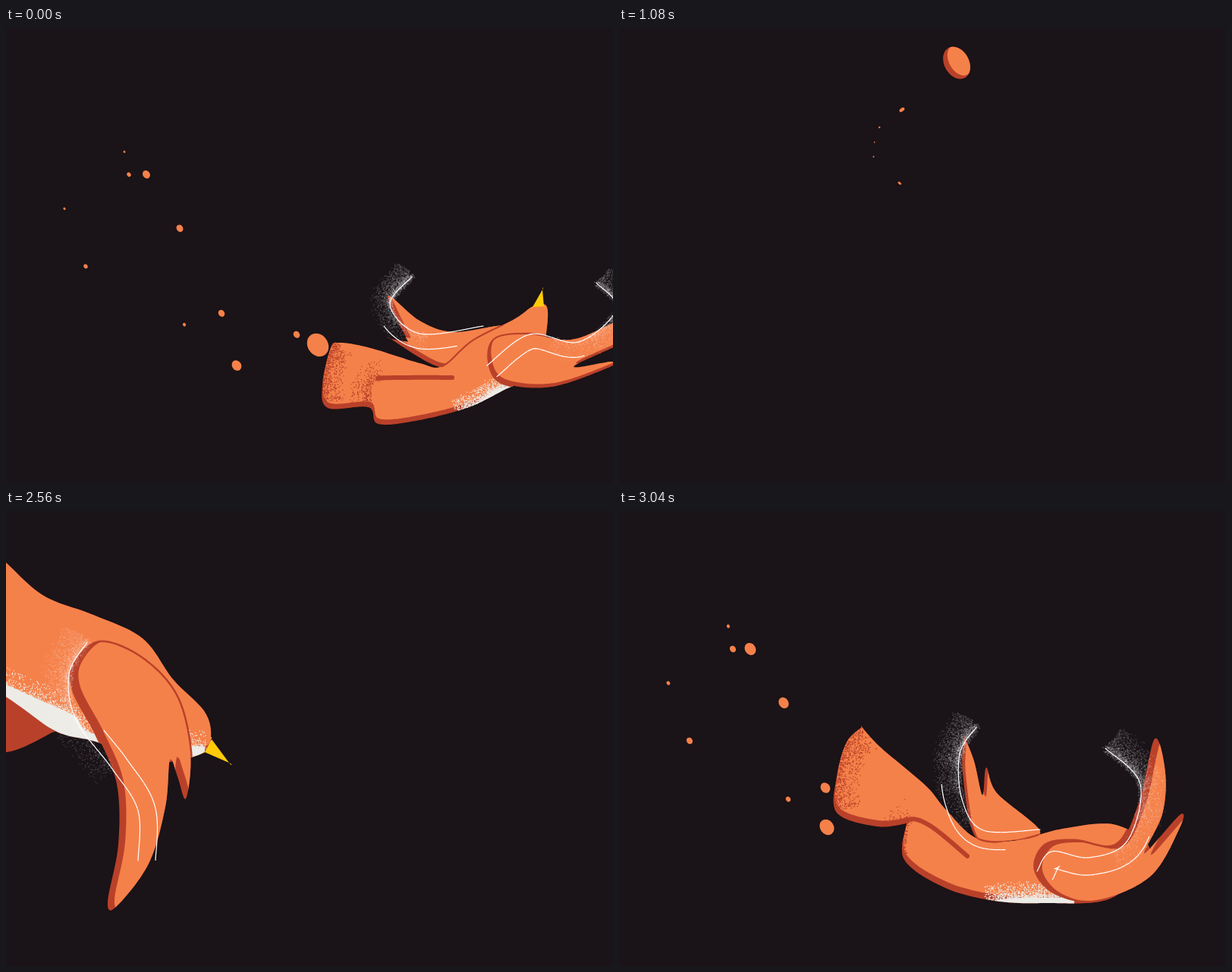
An HTML page with a canvas that plays this animation: 800x600 px, repeating every 3.12 s.

```html
<!DOCTYPE html>
<html lang="en">
<head>
<meta charset="utf-8">
<title>Bird</title>
<style>
html, body { margin: 0; height: 100%; overflow: hidden; background: #1a1317; }
canvas { display: block; width: 100vw; height: 100vh; }
</style>
</head>
<body>
<canvas id="stage" width="800" height="600"></canvas>
<script>
const ctx = document.getElementById('stage').getContext('2d');
const BG = '#1a1317', ORANGE = '#f5814a', RED = '#b9412a', WHITE = '#ecebe6', YELLOW = '#fecb0a';
const LOOP = 3120, SAMPLES = 240;

// Key points of smooth curves; a doubled point is a corner. Shading and trails are derived from them.
const closedParts = ['far', 'body', 'beak', 'near'];
const poses = {
  dive: {
    farShift: [300, 0], nearShift: [9, -3], smoke: -30, size: 1,
    far: '-20,230 65,290 65,290 0,318 -60,300',
    body: '-215,-120 -50,20 0,68 50,112 115,137 180,168 220,222 262,265 270,300 258,320 200,330 118,304 65,290 0,245 -160,140 -290,-20',
    beak: '271,301 294,332 262,318',
    belly: '-10,224 40,247 90,270 120,295 262,311',
    near: '89,235 92,200 125,173 180,195 225,245 243,320 237,380 226,350 216,328 210,390 188,465 145,522 134,515 148,440 146,360 120,295',
    line3: '107,173 83,215 92,275 140,340 174,395 174,461'
  },
  stoop: {
    farShift: [7, 4], nearShift: [10, 1], smoke: 25, size: 1,
    far: '405,395 413,290 435,185 453,138 455,180 443,255 445,324 456,312 474,289 470,330 455,425 430,418',
    body: '182,95 182,95 192,125 230,186 266,240 290,302 345,368 432,416 500,429 556,432 569,448 560,467 525,478 500,505 462,515 415,496 362,462 303,457 262,420 243,338 196,272 138,240 86,228 85,193 115,135 150,106',
    beak: '569,446 602,445 569,466',
    belly: '362,462 400,479 470,493 515,478 568,463',
    near: '431,440 452,385 472,310 489,225 488,163 505,185 521,260 521,340 508,425 508,425 538,377 538,398 520,442 465,482',
    fold: '250,395 243,338 280,365 318,387',
    line1: '449,128 415,205 397,320 406,400',
    line3: '468,139 477,215 463,330 466,410 445,452 428,443'
  },
  sweep: {
    farShift: [4, 2], nearShift: [9, 2], smoke: 28, size: 1,
    far: '470,430 453,345 455,297 455,297 468,330 479,375 484,338 498,372 555,422 520,434',
    body: '320,285 320,285 345,312 404,362 430,393 470,431 520,435 585,419 655,414 700,450 650,510 560,517 495,514 430,497 376,460 379,412 379,412 340,416 287,398 287,350 300,305',
    beak: '690,452 702,455 695,462',
    belly: '485,515 530,510 600,510',
    near: '549,472 562,441 600,435 655,441 685,385 706,300 720,345 716,400 692,452 740,400 738,420 700,482 630,513 575,503',
    fold: '378,465 374,440 381,408 410,415 459,455',
    line1: '471,285 449,320 452,380 480,421 555,420',
    line3: '641,313 687,360 670,435 620,457 570,449 551,475'
  },
  climb: {
    farShift: [4, -5], nearShift: [3, -5], smoke: 22, size: 0.85,
    far: '572,447 507,410 507,410 530,414 530,414 503,353 545,386 590,401 660,393 615,430',
    body: '440,415 480,422 545,442 575,446 615,412 670,384 695,367 713,368 711,410 700,465 668,472 610,500 540,518 490,522 478,500 424,501 417,470 428,422',
    beak: '694,368 707,345 709,367',
    belly: '596,507 625,492 645,477 672,470',
    near: '637,440 645,410 690,404 745,411 800,389 840,370 830,405 748,446 798,440 798,446 720,473 655,468',
    fold: '484,512 478,485 484,464 530,461 588,461',
    line1: '535,328 506,365 545,403 629,393',
    line3: '778,336 805,370 755,414 690,404 634,445'
  },
  away: {
    farShift: [-3, 1], nearShift: [1, -2], smoke: 12, size: 0.35,
    far: '616,198 624,163 640,165 632,180 622,200',
    body: '711,262 712,240 672,209 635,199 597,188 594,200 640,220 660,239 663,228 680,250 686,246 700,282 697,255 705,262',
    beak: '585,190 596,190 588,197',
    belly: '592,198 625,209 645,218 661,236',
    near: '616,200 598,178 586,182 584,168 600,158 614,170',
    line1: '585,151 610,149 621,168 612,190',
    line3: '665,160 648,149 624,185'
  }
};

const lerp = (a, b, u) => a + (b - a) * u;
const mix = (a, b, u) => a.map((v, i) => Array.isArray(v) ? mix(v, b[i], u) : lerp(v, b[i], u));
const spline = (a, b, c, d, u) =>
  b + u * (c - a + u * (2 * a - 5 * b + 4 * c - d + u * (3 * (b - c) + d - a))) / 2;

// Catmull-Rom value of a row of points at position s, counted in points.
function splineAt(points, s, closed) {
  const n = points.length, k = Math.floor(s);
  const at = i => closed ? points[(i + n) % n] : points[Math.max(0, Math.min(n - 1, i))];
  return points[0].map((_, c) => spline(at(k - 1)[c], at(k)[c], at(k + 1)[c], at(k + 2)[c], s - k));
}

function random(seed) {
  return () => {
    seed = (seed * 1664525 + 1013904223) >>> 0;
    return seed / 4294967296;
  };
}

// Curve resampled to equal steps so that any two outlines can blend.
function curve(text, closed, straight) {
  let p = text.split(' ').map(s => s.split(',').map(Number));
  if (straight) p = p.flatMap(q => [q, q]);
  const dense = [], lengths = [0], out = [];
  for (let i = 0; i <= (closed ? p.length : p.length - 1) * 12; i++) {
    dense.push(splineAt(p, i / 12, closed));
    if (i) lengths.push(lengths[i - 1] + Math.hypot(dense[i][0] - dense[i - 1][0], dense[i][1] - dense[i - 1][1]));
  }
  const total = lengths[lengths.length - 1];
  for (let i = 0, k = 1; i <= SAMPLES; i++) {
    const want = total * i / SAMPLES;
    while (k < dense.length - 1 && lengths[k] < want) k++;
    out.push(mix(dense[k - 1], dense[k], (want - lengths[k - 1]) / (lengths[k] - lengths[k - 1] || 1)));
  }
  return out;
}

for (const pose of Object.values(poses))
  for (const key in pose)
    if (typeof pose[key] === 'string') pose[key] = curve(pose[key], closedParts.includes(key), key === 'beak');

function blend(a, b, u) {
  if (u === 0) return a;
  const out = {};
  for (const key in a)
    if (key in b) out[key] = Array.isArray(a[key]) ? mix(a[key], b[key], u) : lerp(a[key], b[key], u);
  return out;
}

const part = (line, from, to) => line.slice(Math.round(from * SAMPLES), Math.round(to * SAMPLES) + 1);
const shifted = (points, dx, dy) => points.map(([x, y]) => [x + dx, y + dy]);

// Point beside a line, at distance d to the left of its direction.
function beside(line, k, d) {
  const [x, y] = line[k], [nx, ny] = line[k + 1];
  const len = Math.hypot(nx - x, ny - y) || 1;
  return [x + (ny - y) / len * d, y - (nx - x) / len * d];
}
const parallel = (line, d) => line.slice(1).map((_, k) => beside(line, k, d));

function trace(points) {
  ctx.beginPath();
  points.forEach(([x, y]) => ctx.lineTo(x, y));
}
function fill(points, color) {
  trace(points);
  ctx.fillStyle = color;
  ctx.fill();
}
function stroke(points, color, width) {
  trace(points);
  ctx.strokeStyle = color;
  ctx.lineWidth = width;
  ctx.lineCap = ctx.lineJoin = 'round';
  ctx.stroke();
}
function clipped(points, draw) {
  ctx.save();
  trace(points);
  ctx.clip();
  draw();
  ctx.restore();
}
// Orange shape whose dark rim shows where the lit area is moved away.
function shaded(points, [dx, dy]) {
  fill(points, RED);
  clipped(points, () => fill(shifted(points, dx, dy), ORANGE));
}

// Speckles that thin out to one side of a line.
function grain(line, width, count, color, dot) {
  const rnd = random(7);
  ctx.fillStyle = color;
  for (let i = 0; i < count; i++) {
    const [x, y] = beside(line, Math.floor(rnd() * (line.length - 1)), width * rnd() ** 2.2);
    const loose = width * 0.3;
    ctx.fillRect(x + (rnd() - 0.5) * loose, y + (rnd() - 0.5) * loose, dot, dot);
  }
}
// Motion smoke: densest near the middle of its line, soft at both ends.
function smoke(line, width, size) {
  for (const end of [0.25, 0.4, 0.6])
    grain(part(line, 0, end), width * (1.3 - end / 2), 900 * size, 'rgba(255,255,255,.16)', 0.8 + 0.5 * size);
}

function drawBird(b) {
  const s = b.size, dot = 0.7 + 0.5 * s, gap = 23 * s;
  shaded(b.far, b.farShift);
  if (b.line1) smoke(b.line1, -Math.abs(b.smoke), s);
  shaded(b.body, [2 * s, -8 * s]);
  clipped(b.far, () => stroke(b.body, RED, 2.5 * s));
  clipped(b.body, () => {
    fill([...b.belly, ...shifted(b.belly, 0, 60 * s).reverse()], WHITE);
    grain(b.belly, 20 * s, 1200 * s, WHITE, dot);
    grain(part(b.body, 0.89, 1), -30 * s, 900 * s, RED, dot);
    if (b.fold) {
      grain(part(b.fold, 0, 0.4), 30 * s, 600 * s, RED, dot);
      stroke(part(b.fold, 0.37, 1), RED, 6);
    }
  });
  fill(b.beak, YELLOW);
  clipped(b.body, () => stroke(b.near, RED, 5 * s));
  shaded(b.near, b.nearShift);
  smoke(b.line3, b.smoke, s);
  const lines = [b.line3, parallel(part(b.line3, 0.45, 1), gap)];
  if (b.line1) lines.push(b.line1, parallel(part(b.line1, 0.35, 0.8), -gap));
  lines.forEach(line => stroke(line, '#fff', 1.2));
}

function drop(x, y, rx, ry = rx * 1.2, turn = -0.6, color = ORANGE) {
  if (rx <= 0.6 || ry <= 0.6) return;
  ctx.beginPath();
  ctx.ellipse(x, y, rx, ry, turn, 0, 7);
  ctx.fillStyle = color;
  ctx.fill();
}

// Drops shed in the dive: x, y, radius and speed when the bird levels out.
const shed = [
  [144, 152, 2], [150, 182, 3.8], [173, 182, 7], [217, 253, 6.3], [65, 227, 2.2], [93, 303, 3.8],
  [223, 380, 3], [272, 365, 6], [274, 417, 9, 2.5], [371, 393, 6], [411, 418, 20, 0]
];
function drawShed(t) {
  const age = (t + LOOP / 2) % LOOP - LOOP / 2 + 80;
  if (age < -160 || age > 240) return;
  for (const [x, y, r, speed = 1] of shed)
    drop(x + 0.15 * age * speed, y + 0.14 * age * speed, r * Math.min(1.2, 1 - age / 240));
}

// Way of the small bird: x, y and scale every 160 ms.
const BEAT = 160, VANISH = 1080;
const route = [
  [570, 480, 1.4], [705, 345, 1.2], [645, 210, 1], [560, 175, 0.8],
  [480, 205, 0.65], [400, 215, 0.5], [337, 140, 0.4], [470, 40, 0.3]
];
const routeAt = t => splineAt(route, t / BEAT);
function headingAt(t) {
  const [x, y] = routeAt(t - 5), [nx, ny] = routeAt(t + 5);
  return Math.atan2(ny - y, nx - x);
}

function drawTrail(t) {
  const rnd = random(9), life = 350;
  for (let born = 20; born < Math.min(t, VANISH); born += 32) {
    const [x, y, scale] = routeAt(born), age = t - born, left = 1 - age / life;
    const r = (1.5 + 5.5 * rnd() ** 2) * (0.3 + 0.7 * scale) * left;
    const side = (rnd() - 0.5) * 24 * scale, stretch = 1 + rnd() * 1.2;
    if (age > 40 && left > 0) drop(x + side, y + age * 0.03, r, r * stretch, headingAt(born) + Math.PI / 2);
  }
}

function drawSmallBird(t) {
  const [x, y, scale] = routeAt(t);
  ctx.save();
  ctx.translate(x, y);
  ctx.rotate(headingAt(t) - headingAt(2 * BEAT));
  ctx.scale(scale, scale);
  ctx.translate(-645, -210);
  drawBird(poses.away);
  ctx.restore();
}

function drawBall(t) {
  const u = Math.max(0, (t - 1200) / 480), tall = 22.5 + 6 * u;
  ctx.save();
  ctx.translate(lerp(445, 393, u), 46 + 470 * u * u);
  ctx.rotate(lerp(-0.5, 0, Math.min(1, u * 1.5)));
  drop(0, 0, 16.3, tall, 0, RED);
  ctx.clip();
  drop(5, -1, 14, tall - 1, 0);
  ctx.restore();
}

function drawSplash(t) {
  const u = (t - 1680) / 400, rnd = random(11);
  drop(393, 535, 62 * (1 - u), 18 * (1 - u) ** 2, 0);
  for (let i = 0; i < 16; i++) {
    const x = (rnd() - 0.5) * 205, lift = 180 + rnd() * 480, r = 3 + rnd() * 8;
    drop(393 + x * Math.sqrt(u), 525 - lift * u * (1.05 - u), r * (1 - u), r * 1.3 * (1 - u), x / 160);
  }
}

function drawMoved(dx, dy, bird) {
  ctx.save();
  ctx.translate(dx, dy);
  drawBird(bird);
  ctx.restore();
}

function drawScene(t) {
  ctx.fillStyle = BG;
  ctx.fillRect(0, 0, 800, 600);
  drawShed(t);
  drawTrail(t);
  if (t < 320) {
    const u = t / 320, arc = Math.sin(Math.PI * u);
    drawMoved(75 * arc, 20 * arc, blend(poses.climb, poses.away, u));
  } else if (t < VANISH) drawSmallBird(t);
  else if (t < 1680) drawBall(t);
  else if (t < 2080) drawSplash(t);
  else if (t >= 3040) drawBird(poses.sweep);
  else if (t >= 2880) drawBird(blend(poses.stoop, poses.sweep, (t - 2880) / 160));
  else if (t >= 2560) drawBird(blend(poses.dive, poses.stoop, (t - 2560) / 320));
  else if (t >= 2440) drawMoved((t - 2560) * 1.2, (t - 2560) * 1.3, poses.dive);
}

const onTwos = t => t >= 240 && t < 640 || t >= 1200 && t < 1680 || t >= 2480;
let shown = -1;
function tick(now) {
  const t = now % LOOP, step = onTwos(t) ? 80 : 40, held = Math.floor(t / step) * step;
  if (held !== shown) drawScene(shown = held);
  requestAnimationFrame(tick);
}
requestAnimationFrame(() => tick(performance.now()));
</script>
</body>
</html>
```
